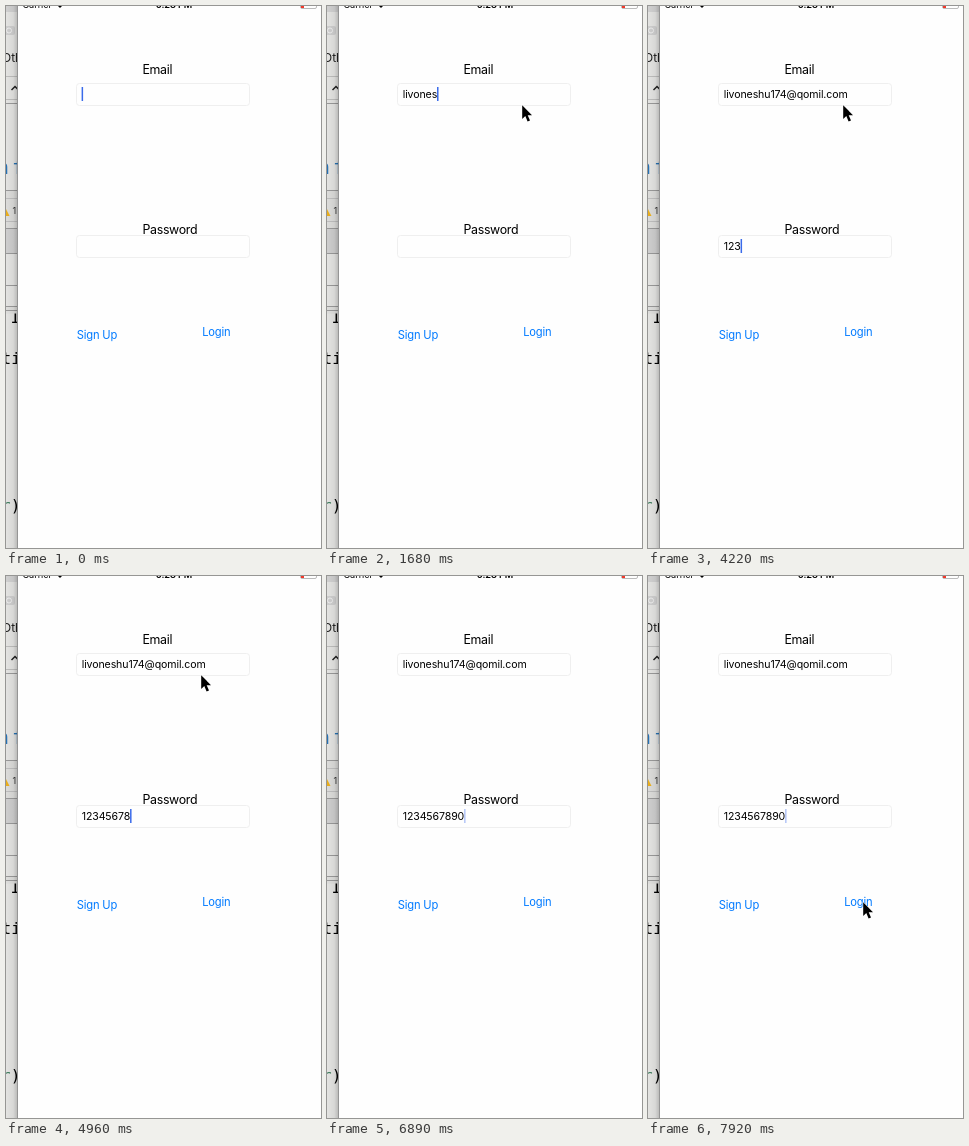
These frames come from a looping animation (315 px wide and 542 px high, 8000 ms). An HTML page:

```html
<!DOCTYPE html>
<html lang="en">
<head>
<meta charset="utf-8">
<title>Login form</title>
<style>
  html, body { margin: 0; width: 100%; height: 100%; overflow: hidden; background: #fefefe; }
  svg { display: block; width: 315px; height: 542px; font-family: Inter, Roboto, sans-serif; }
  .label { font-size: 12.4px; letter-spacing: -.34px; }
  .value { font-size: 10.6px; letter-spacing: -.12px; }
  .button { font-size: 11.2px; letter-spacing: -.2px; fill: #007aff; }
  .status { font-size: 9.2px; letter-spacing: -.1px; }
  .code { font: 16px "DejaVu Sans Mono", monospace; }
  .heading { font: 20px "DejaVu Sans Mono", monospace; fill: #2774b8; }
  .field { fill: #fefefe; stroke: #efefef; }
  .rule { stroke: #9c9c9c; }
</style>
</head>
<body>
<svg viewBox="0 0 315 542">
  <defs>
    <linearGradient id="shade">
      <stop offset="0" stop-opacity=".02"/>
      <stop offset=".6" stop-opacity=".07"/>
      <stop offset="1" stop-opacity=".22"/>
    </linearGradient>
  </defs>

  <!-- window behind the phone -->
  <rect width="12" height="542" fill="#e8e8e6"/>
  <rect width="12" height="6" fill="#d4d4d4"/>
  <rect x="-5" y="20" width="14" height="9" rx="2" fill="#d2d2d2"/>
  <circle cx="3" cy="24.5" r="2.5" fill="none" stroke="#f2f2f2"/>
  <text x="-4" y="56" font-size="12" fill="#1c1c1c">Oth</text>
  <path class="rule" d="M0 70.5H12M0 93.5H12" opacity=".5"/>
  <path d="M5.5 84L9 80.5L12.5 84" fill="none" stroke="#222" stroke-width="1.5"/>
  <path class="rule" d="M0 97.5H12"/>
  <text class="heading" x="-9" y="168">n</text>
  <text class="heading" x="6" y="168">f</text>
  <path class="rule" d="M0 184.5H12"/>
  <rect y="185" width="12" height="37" fill="#e0e0de"/>
  <path d="M0 192.5H12M0 215.5H12" stroke="#c2c2c2"/>
  <path d="M-5 210L-1 201L3.5 210Z" fill="#f0b21c"/>
  <text x="6.5" y="208" font-size="9" fill="#333">1</text>
  <rect y="222" width="12" height="25" fill="#d2d2d2"/>
  <path class="rule" d="M0 222.5H12M0 247.5H12M0 279.5H12M0 300.5H12"/>
  <text class="code" x="4" y="317">1</text>
  <rect y="301" width="12" height="6.5" fill="#e2e2e0"/>
  <path class="rule" d="M0 304.5H12"/>
  <text class="code" x="-4.5" y="358">ti</text>
  <text class="code" x="-5" y="505"><tspan fill="#3f7f5f">r</tspan>)</text>
  <rect width="12" height="542" fill="url(#shade)"/>

  <!-- phone screen -->
  <rect x="12" width="303" height="542" fill="#fefefe"/>
  <path d="M11.5 0V542" stroke="#959595"/>
  <text class="status" x="16.5" y="2">Carrier</text>
  <path d="M51 -1L54 2L57 -1Z"/>
  <text class="status" x="150" y="2" font-weight="600">5:28 PM</text>
  <rect x="294.5" y="-5.5" width="16" height="8" rx="1.5" fill="none" stroke="#aaa" stroke-width=".8"/>
  <rect x="295" y="-5" width="3" height="7" fill="#f0392b"/>

  <rect class="field" x="70.5" y="77.5" width="173" height="22" rx="3"/>
  <rect class="field" x="70.5" y="229.5" width="173" height="22" rx="3"/>
  <text class="label" x="136.5" y="68">Email</text>
  <text class="label" x="136.5" y="228">Password</text>
  <text class="value" id="email" x="75.7" y="92"></text>
  <text class="value" id="password" x="75.7" y="244"></text>
  <text class="button" x="70.8" y="332.5">Sign Up</text>
  <text class="button" x="196.2" y="330">Login</text>
  <rect id="caret" width="1.5" height="14" fill="#3a6bea"/>
  <path id="pointer" d="M0 0V13.8L3.1 10.9L5.4 16.3L7.8 15.2L5.5 10H9.8Z"
        stroke="#fff" stroke-linejoin="round" paint-order="stroke"/>
</svg>
<script>
const LOOP = 8000;
const TICK = 148.95, OFFSET = 20;   // the screen refreshes once per tick
const EMAIL = "livoneshu174@qomil.com";
const PASSWORD = "1234567890";
const FIRST_KEY = 7, FOCUS = 25, PASSWORD_SHOWN = 28, LAST_KEY = 35;
const BLINK = 7;

// Key points: tick, then values, joined by straight lines
const emailKeys = [[6, 0], [7, 1], [8, 1], [12, 9], [13, 9], [15, 12], [16, 12], [19, 17], [24, 22]];
const pointerPaths = [
  [[3, 303, 183], [4, 195.2, 99.2], [38, 195.2, 99.2], [39, 303, 458]],
  [[51, 266, 306], [53, 215.2, 326.2]]
];

const byId = id => document.getElementById(id);
const email = byId("email"), password = byId("password");
const caret = byId("caret"), pointer = byId("pointer");

const clamp = (x, low, high) => Math.min(high, Math.max(low, x));

function follow(keys, tick) {
  const next = Math.max(1, keys.findIndex(([start]) => start >= tick));
  const [from, ...a] = keys[next - 1], [to, ...b] = keys[next];
  const part = clamp((tick - from) / (to - from), 0, 1);
  return a.map((value, i) => value + (b[i] - value) * part);
}

function type(node, text, count) {
  const shown = text.slice(0, count);
  if (node.textContent !== shown) node.textContent = shown;
}

function drawCaret(tick) {
  const inEmail = tick < FOCUS;
  const field = inEmail ? email : password;
  const width = field.textContent ? field.getComputedTextLength() : 0;
  // solid while typing, blinking when idle
  const idle = tick < FIRST_KEY ? tick + 1 : Math.max(0, tick - LAST_KEY);
  const glow = .5 + .9 * Math.cos((idle - 2.1) / BLINK * 2 * Math.PI);
  caret.setAttribute("x", 75.6 + width);
  caret.setAttribute("y", inEmail ? 81 : 233);
  caret.setAttribute("opacity", idle < 4 ? 1 : clamp(glow, 0, 1));
}

function drawPointer(tick) {
  const path = pointerPaths.find(keys => tick >= keys[0][0] && tick <= keys.at(-1)[0]);
  pointer.setAttribute("visibility", path ? "visible" : "hidden");
  if (path) pointer.setAttribute("transform", `translate(${follow(path, tick)})`);
}

function draw(time) {
  const tick = Math.max(0, Math.floor((time - OFFSET) / TICK));
  const lastEmailTick = emailKeys.at(-1)[0];
  type(email, EMAIL, Math.round(follow(emailKeys, Math.min(tick, lastEmailTick))[0]));
  type(password, PASSWORD, tick < PASSWORD_SHOWN ? 0 : tick - FOCUS);
  drawCaret(tick);
  drawPointer(tick);
}

const begin = performance.now();
function play() {
  draw((performance.now() - begin) % LOOP);
  requestAnimationFrame(play);
}
play();
</script>
</body>
</html>
```
